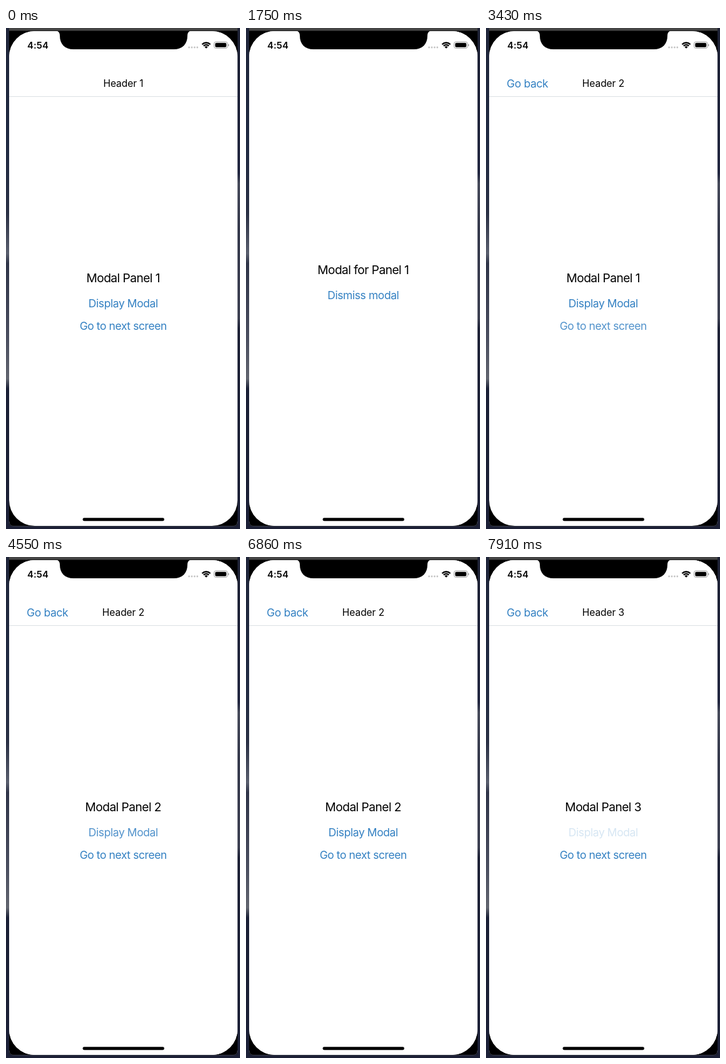
An HTML page with a canvas for the animation above (8000 ms loop, 374 by 800 pixels).

```html
<!DOCTYPE html>
<html lang="en">
<head>
<meta charset="utf-8">
<title>Modal stack demo</title>
<style>
html, body { margin: 0; width: 100%; height: 100%; overflow: hidden; background: #1c2036; }
canvas { display: block; width: 374px; height: 800px; }
</style>
</head>
<body>
<canvas id="stage"></canvas>
<script>
const LOOP = 8000, STEP = 70;
const SCREEN = { x: 5, y: 5, w: 365, h: 790 };
const MID = 187.5;
const BLUE = '#3380c2', INK = '#000';

const canvas = document.getElementById('stage');
const ctx = canvas.getContext('2d');
const dpr = window.devicePixelRatio || 1;
canvas.width = 374 * dpr;
canvas.height = 800 * dpr;

// Critically damped spring, 0 to 1, settling in about 400 ms
function spring(t, start) {
  if (t <= start) return 0;
  const u = 18.26 * (t - start) / 1000;
  const rest = (1 + u) * Math.exp(-u);
  return rest < 0.005 ? 1 : 1 - rest;
}

const easeInOut = p => p < 0.5 ? 2 * p * p : 1 - 2 * (1 - p) ** 2;
const clamp = v => Math.max(0, Math.min(1, v));

// Touch feedback: dim to 0.2 on press, return over 250 ms after release
function touch(t, presses) {
  for (const [down, up, fade = 1] of presses) {
    if (t < down || t > up + 250) continue;
    if (t < up) return 1 - 0.8 * easeInOut(clamp((t - down) / fade));
    return 0.2 + 0.8 * easeInOut((t - up) / 250);
  }
  return 1;
}

const displayTaps = [[740, 980, 150], [4335, 4375], [7905, 8100]];
const nextTaps = [[3215, 3255], [6890, 6895]];
const dismissTaps = [[1910, 2095, 110], [5660, 5665]];

const modals = [
  { panel: 1, open: 1085, close: 2096, y: 0 },
  { panel: 2, open: 4478, close: 5665, y: 0 }
];
const pushes = [3405, 7045];

function text(str, x, y, size, color, { spacing = 0, weight = 400, align = 'center', alpha = 1 } = {}) {
  ctx.font = `${weight} ${size}px Inter, "Liberation Sans", sans-serif`;
  ctx.letterSpacing = spacing + 'px';
  ctx.textAlign = align;
  ctx.fillStyle = color;
  ctx.globalAlpha = alpha;
  ctx.fillText(str, align === 'center' ? x + spacing / 2 : x, y);
  ctx.globalAlpha = 1;
}

const title = (str, y) => text(str, MID, y, 19.2, INK, { spacing: -0.55 });
const link = (str, y, alpha) => text(str, MID, y, 17.5, BLUE, { spacing: -0.42, alpha });

function box(x, y, w, h, r, color) {
  ctx.fillStyle = color;
  ctx.beginPath();
  ctx.roundRect(x, y, w, h, r);
  ctx.fill();
}

function sheet(dx, dy, draw) {
  ctx.save();
  ctx.translate(dx, dy);
  ctx.fillStyle = '#fff';
  ctx.fillRect(SCREEN.x, SCREEN.y, SCREEN.w, SCREEN.h);
  draw();
  ctx.restore();
}

function panel(n, dx, t) {
  sheet(dx, 0, () => {
    title('Modal Panel ' + n, 406);
    link('Display Modal', 445.5, touch(t, displayTaps));
    link('Go to next screen', 482, dx ? 1 : touch(t, nextTaps));
  });
}

function header(n) {
  ctx.fillStyle = '#fff';
  ctx.fillRect(SCREEN.x, SCREEN.y, SCREEN.w, 105);
  ctx.fillStyle = '#dce1e4';
  ctx.fillRect(SCREEN.x, 109, SCREEN.w, 1);
  text('Header ' + n, MID, 94, 15.6, INK, { spacing: -0.1 });
  if (n > 1) text('Go back', 33, 95, 17.5, BLUE, { spacing: -0.35, align: 'left' });
}

function modal(m, t) {
  if (t <= m.open) return;
  const shift = 1 - spring(t, m.open) + spring(t, m.close);
  if (shift >= 1) return;
  sheet(0, shift * SCREEN.h, () => {
    title('Modal for Panel ' + m.panel, 393);
    link('Dismiss modal', 433, touch(t, dismissTaps));
  });
}

function desktop() {
  ctx.fillStyle = '#1c2036';
  ctx.fillRect(0, 0, 374, 800);
  const side = ctx.createLinearGradient(0, 0, 0, 800);
  [[0, '#20263a'], [0.22, '#202a42'], [0.37, '#2b3145'], [0.45, '#5a5f6e'], [0.47, '#303549'],
   [0.62, '#4b4f60'], [0.7, '#62656f'], [0.72, '#1b2036'], [1, '#1c2037']]
    .forEach(([p, c]) => side.addColorStop(p, c));
  ctx.fillStyle = side;
  ctx.fillRect(0, 0, 5, 800);
  const right = ctx.createLinearGradient(0, 0, 0, 800);
  [[0, '#1d2134'], [0.29, '#222740'], [0.31, '#474b5b'], [0.4, '#35394c'], [0.58, '#3d4052'],
   [0.6, '#1f2338'], [1, '#1c2037']]
    .forEach(([p, c]) => right.addColorStop(p, c));
  ctx.fillStyle = right;
  ctx.fillRect(370, 0, 4, 800);
  ctx.fillStyle = '#454545';
  ctx.fillRect(5, 0, 365, 5);
  box(5, 4.5, 365, 791, [0, 0, 5, 5], '#000');
  ctx.strokeStyle = '#4a4d5a';
  ctx.lineWidth = 0.8;
  ctx.beginPath();
  ctx.moveTo(5.2, 788);
  ctx.quadraticCurveTo(5.4, 795.4, 12, 795.4);
  ctx.lineTo(363, 795.4);
  ctx.quadraticCurveTo(369.8, 795.4, 370, 788);
  ctx.stroke();
}

function notch() {
  ctx.fillStyle = '#000';
  ctx.beginPath();
  ctx.moveTo(79, 4);
  ctx.quadraticCurveTo(86, 5, 86, 12);
  ctx.bezierCurveTo(86, 26, 94, 34, 108, 34);
  ctx.lineTo(268, 34);
  ctx.bezierCurveTo(282, 34, 290, 26, 290, 12);
  ctx.quadraticCurveTo(290, 5, 297, 4);
  ctx.fill();
}

function wifi(x, y) {
  const a = Math.PI * 0.25;
  ctx.strokeStyle = INK;
  ctx.lineWidth = 2.3;
  for (const r of [9.3, 5.9]) {
    ctx.beginPath();
    ctx.arc(x, y, r, -Math.PI / 2 - a, -Math.PI / 2 + a);
    ctx.stroke();
  }
  ctx.fillStyle = INK;
  ctx.beginPath();
  ctx.moveTo(x, y);
  ctx.arc(x, y, 3.6, -Math.PI / 2 - a, -Math.PI / 2 + a);
  ctx.fill();
}

function statusBar() {
  text('4:54', 34, 32.6, 14.8, INK, { weight: 600, align: 'left', spacing: 0.1 });
  for (let i = 0; i < 4; i++) box(291.2 + i * 4.4, 29.6, 2.8, 2.8, 1.4, '#c4c4c4');
  wifi(320, 32.8);
  ctx.strokeStyle = '#a0a0a0';
  ctx.lineWidth = 1;
  ctx.beginPath();
  ctx.roundRect(332.5, 22, 21.5, 10.5, 3.2);
  ctx.stroke();
  box(334.3, 23.8, 17.9, 6.9, 1.8, INK);
  box(355, 25.4, 1.4, 3.8, 0.7, '#a0a0a0');
}

function draw(t) {
  ctx.setTransform(dpr, 0, 0, dpr, 0, 0);
  desktop();
  ctx.save();
  ctx.beginPath();
  ctx.roundRect(SCREEN.x, SCREEN.y, SCREEN.w, SCREEN.h, 41);
  ctx.clip();

  panel(1, 0, t);
  pushes.forEach((start, i) => {
    const p = spring(t, start);
    if (p) panel(i + 2, (1 - p) * SCREEN.w, t);
  });
  header(1 + pushes.filter(start => t >= start - 45).length);
  modals.forEach(m => modal(m, t));

  notch();
  statusBar();
  box(122.5, 782.3, 130.5, 4.9, 2.45, INK);
  ctx.restore();
}

function frame(now) {
  const t = Math.min(now % LOOP, 7979);
  draw(Math.floor(t / STEP) * STEP);
  requestAnimationFrame(frame);
}
draw(0);
requestAnimationFrame(frame);
</script>
</body>
</html>
```
